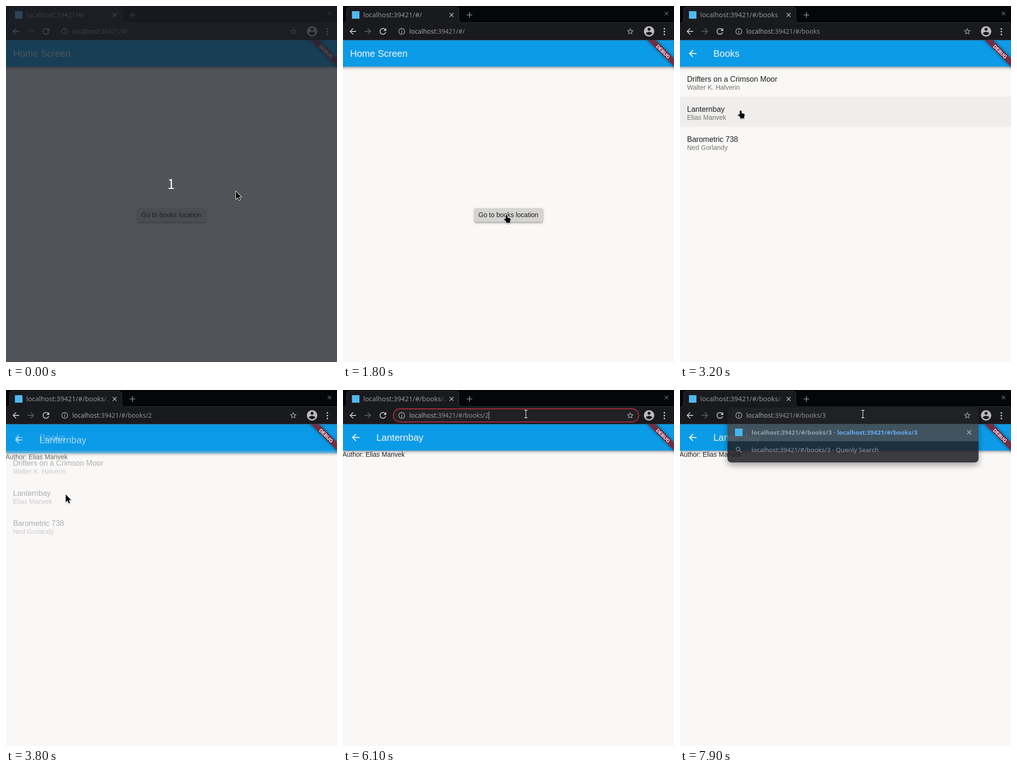
These frames come from a looping animation (704x757 px, 8 s). An HTML page with a canvas:

```html
<!DOCTYPE html>
<html lang="en">
<head>
<meta charset="utf-8">
<title>Book navigation</title>
<style>
html, body { margin: 0; width: 704px; height: 757px; overflow: hidden; background: #f9f8f7; }
canvas { display: block; }
</style>
</head>
<body>
<canvas id="stage" width="704" height="757"></canvas>
<script>
const W = 704, H = 757, LOOP = 8000, STEP = 100, TOP = 73;
const APP = '"Liberation Sans", Arial, sans-serif';
const UI = '"Noto Sans", "Open Sans", sans-serif';
const COUNT = '"Noto Sans CJK JP", "Noto Sans CJK SC", "Noto Sans CJK", sans-serif';
const BAR = '#191a1e', FIELD = '#202125', PAPER = '#f9f8f7', BLUE = '#0c9be7', RED = '#b02a3c', MARK = '#4fb9f0';
const SITE = 'localhost:39421/#/';
const BOOKS = [
  ['Drifters on a Crimson Moor', 'Walter K. Halverin'],
  ['Lanternbay', 'Elias Manvek'],
  ['Barometric 738', 'Ned Gorlandy']
];

const main = document.getElementById('stage').getContext('2d');
const spare = document.createElement('canvas');
spare.width = W;
spare.height = H;
const off = spare.getContext('2d');
let c = main;

const ICON = {
  back: 'M20 11H7.83l5.59-5.59L12 4l-8 8 8 8 1.41-1.41L7.83 13H20v-2z',
  reload: 'M17.65 6.35C16.2 4.9 14.21 4 12 4c-4.42 0-8 3.58-8 8s3.58 8 8 8c3.73 0 6.84-2.55 7.73-6h-2.08c-.82 2.33-3.04 4-5.65 4-3.31 0-6-2.69-6-6s2.69-6 6-6c1.66 0 3.14.69 4.22 1.78L13 11h7V4l-2.35 2.35z',
  star: 'M22 9.24l-7.19-.62L12 2 9.19 8.63 2 9.24l5.46 4.73L5.82 21 12 17.27 18.18 21l-1.63-7.03L22 9.24zM12 15.4l-3.76 2.27 1-4.28-3.32-2.88 4.38-.38L12 6.1l1.71 4.04 4.38.38-3.32 2.88 1 4.28L12 15.4z',
  person: 'M12 2C6.48 2 2 6.48 2 12s4.48 10 10 10 10-4.48 10-10S17.52 2 12 2zm0 3c1.66 0 3 1.34 3 3s-1.34 3-3 3-3-1.34-3-3 1.34-3 3-3zm0 14.2c-2.5 0-4.71-1.28-6-3.22.03-1.99 4-3.08 6-3.08 1.99 0 5.97 1.09 6 3.08-1.29 1.94-3.5 3.22-6 3.22z',
  search: 'M15.5 14h-.79l-.28-.27C15.41 12.59 16 11.11 16 9.5 16 5.91 13.09 3 9.5 3S3 5.91 3 9.5 5.91 16 9.5 16c1.61 0 3.09-.59 4.23-1.57l.27.28v.79l5 4.99L20.49 19l-4.99-5zm-6 0C7.01 14 5 11.99 5 9.5S7.01 5 9.5 5 14 7.01 14 9.5 11.99 14 9.5 14z'
};
for (const k in ICON) ICON[k] = new Path2D(ICON[k]);
const ARROW = new Path2D('M0 0V16.5L3.8 13L6.6 19L9.2 17.8L6.5 12H11.5Z');
const HAND = new Path2D('M0 1.5Q2 -.8 4 1.5V6L9 7Q11 8 10.5 10.5L9.2 14V17H1V14L-3.5 10Q-4 8 -2 8L0 9.2Z');

function rect(x, y, w, h, color) {
  c.fillStyle = color;
  c.fillRect(x, y, w, h);
}
function round(x, y, w, h, r) {
  c.beginPath();
  c.roundRect(x, y, w, h, r);
}
function shadow(color, blur, dy) {
  c.shadowColor = color;
  c.shadowBlur = blur;
  c.shadowOffsetY = dy;
}
function text(s, x, y, size, color, family = APP, weight = 'normal') {
  c.font = `${weight} ${size}px ${family}`;
  c.fillStyle = color;
  c.fillText(s, x, y);
  return x + c.measureText(s).width;
}
function icon(path, x, y, scale, color, flip = 1) {
  c.save();
  c.translate(x, y);
  c.scale(scale * flip, scale);
  c.translate(-12, -12);
  c.fillStyle = color;
  c.fill(path);
  c.restore();
}
function lines(points, color, width) {
  c.strokeStyle = color;
  c.lineWidth = width;
  c.beginPath();
  for (const [x1, y1, x2, y2] of points) {
    c.moveTo(x1, y1);
    c.lineTo(x2, y2);
  }
  c.stroke();
}
const cross = (x, y, r, color, w) =>
  lines([[x - r, y - r, x + r, y + r], [x - r, y + r, x + r, y - r]], color, w);

// Paint on the spare canvas, then blend the result as one piece
function layer(alpha, dy, paint) {
  off.clearRect(0, 0, W, H);
  c = off;
  paint();
  c = main;
  c.save();
  c.globalAlpha = alpha;
  c.drawImage(spare, 0, dy);
  c.restore();
}

function bezier(x1, y1, x2, y2) {
  const at = (a, b, u) => 3 * a * u * (1 - u) ** 2 + 3 * b * u * u * (1 - u) + u ** 3;
  return x => {
    let lo = 0, hi = 1;
    for (let i = 0; i < 24; i++) {
      const mid = (lo + hi) / 2;
      if (at(x1, x2, mid) < x) lo = mid; else hi = mid;
    }
    return at(y1, y2, lo);
  };
}
const easeIn = bezier(.42, 0, 1, 1);
const fastOutSlowIn = bezier(.4, 0, .2, 1);

function appBar(title, back) {
  c.save();
  shadow('rgba(0,0,0,.42)', 6, 2);
  rect(-10, TOP, W + 20, 56, BLUE);
  c.restore();
  if (back) icon(ICON.back, 27, 101, 1, '#f4f8fb');
  text(title, back ? 71 : 15, 108, 20, '#f2f8fc');
}

function home(t) {
  rect(0, TOP, W, H, PAPER);
  appBar('Home Screen', false);
  c.save();
  shadow('rgba(0,0,0,.4)', 4, 2);
  c.fillStyle = t < 800 ? '#e0e0df' : t < 1800 ? '#d9d8d7' : '#d5d4d3';
  round(280, 430, 145, 29, 2);
  c.fill();
  c.restore();
  text('Go to books location', 288, 449, 14, '#1f1f1f');
}

function list(t) {
  rect(0, TOP, W, H, PAPER);
  const hot = t >= 2600 && t < 2800 ? 2 : t >= 2800 && t < 3700 ? 1 : -1;
  if (hot >= 0) rect(0, 129 + hot * 64, W, 64, '#efeeed');
  appBar('Books', true);
  BOOKS.forEach(([title, author], i) => {
    text(title, 15, 161 + i * 64, 16, '#1f1f1f');
    text(author, 15, 178 + i * 64, 14, '#757574');
  });
}

function detail() {
  rect(0, TOP, W, H, PAPER);
  appBar(BOOKS[1][0], true);
  text('Author: ' + BOOKS[1][1], -1, 142, 14, '#1f1f1f');
}

function enter(t, start, from, to) {
  const p = Math.min(1, Math.max(0, (t - start) / 300));
  if (p < 1) from(t);
  if (p > 0) layer(easeIn(p), (1 - fastOutSlowIn(p)) * 171, () => to(t));
}

function banner() {
  c.save();
  c.translate(705, TOP);
  c.rotate(Math.PI / 4);
  c.save();
  shadow('rgba(0,0,0,.5)', 7, 0);
  rect(-60, 28, 120, 12, '#762d42');
  c.restore();
  c.textAlign = 'center';
  text('DEBUG', 0, 37.7, 10.2, '#fff', APP, '900');
  c.restore();
}

function pages(t) {
  c.save();
  c.beginPath();
  c.rect(0, TOP, W, H);
  c.clip();
  if (t < 2500) enter(t, 1866, home, list);
  else enter(t, 3566, list, detail);
  banner();
  c.restore();
}

function address(s, x) {
  const end = text(s.slice(0, 9), x, 59, 13.5, '#a4a4a4', UI);
  return text(s.slice(9), end, 59, 13.5, '#8d8d8f', UI);
}

function tabs(path) {
  rect(0, 0, W, 37, '#050608');
  rect(0, 36, W, 37, BAR);
  c.beginPath();
  c.moveTo(0, 36.5);
  c.quadraticCurveTo(7.5, 36.5, 7.5, 29);
  c.lineTo(7.5, 10);
  c.quadraticCurveTo(7.5, 2.5, 15, 2.5);
  c.lineTo(239, 2.5);
  c.quadraticCurveTo(246.5, 2.5, 246.5, 10);
  c.lineTo(246.5, 29);
  c.quadraticCurveTo(246.5, 35.5, 253, 35.5);
  c.lineTo(W, 35.5);
  c.strokeStyle = '#4b4c50';
  c.lineWidth = 1;
  c.stroke();
  c.lineTo(W, 40);
  c.lineTo(0, 40);
  c.fillStyle = BAR;
  c.fill();
  rect(0, 72, W, 1, '#45474b');

  rect(19, 11, 16, 16, MARK);
  const fade = c.createLinearGradient(206, 0, 219, 0);
  fade.addColorStop(0, '#929294');
  fade.addColorStop(1, 'rgba(146,146,148,0)');
  text(SITE + path, 43, 24, 14.3, fade, UI);
  cross(231, 19, 4, '#b4b4b6', 1.6);
  lines([[263, 19, 275, 19], [269, 13, 269, 25]], '#8a8a8c', 1.6);
  cross(688, 16, 3.5, '#6d6d70', 1.4);

  icon(ICON.back, 21, 54, .88, '#c4c4c6');
  icon(ICON.back, 53, 54, .88, '#58595d', -1);
  icon(ICON.reload, 85, 54, .88, '#c4c4c6');
  icon(ICON.person, 651, 54, 1.1, '#bcbcbe');
  c.fillStyle = '#c4c4c6';
  for (const y of [48.5, 54.5, 60.5]) {
    c.beginPath();
    c.arc(683.5, y, 1.7, 0, 7);
    c.fill();
  }
}

const caretOn = t => (t >= 5100 && t < 5600) || (t >= 6100 && t < 7300) || t === 7800;

function omnibox(path, t) {
  c.strokeStyle = '#a9a9ab';
  c.lineWidth = 1.4;
  c.beginPath();
  c.arc(125, 54, 6.3, 0, 7);
  c.stroke();
  rect(124.3, 53, 1.5, 4.5, '#a9a9ab');
  rect(124.3, 50, 1.5, 1.6, '#a9a9ab');
  icon(ICON.star, 611, 54, .72, '#a9a9ab');
  if (t >= 4800 && t < 5100) rect(141, 45, 169, 18, RED);
  const end = address(SITE + path, 141);
  if (t < 6600 && caretOn(t)) rect(Math.round(end), 45, 1, 18, '#c0c0c2');
}

function field(t) {
  if (t < 4700) return;
  round(107, 40, 522, 28, 14);
  c.fillStyle = FIELD;
  c.fill();
  if (t >= 4800 && t < 6600) {
    c.strokeStyle = RED;
    c.lineWidth = 2;
    c.stroke();
  }
}

function popup(path, t) {
  const url = SITE + path, rows = t < 6800 ? 5 : 2;
  c.save();
  shadow('rgba(0,0,0,.4)', 14, 6);
  c.fillStyle = FIELD;
  round(101, 37, 534, 43 + rows * 37, 8);
  c.fill();
  c.restore();
  rect(101, 72, 534, 37, '#48494c');
  rect(117, 82, 16, 16, MARK);
  text(url, 152, 95, 13, '#a0a0a1', UI, 'bold');
  const end = 152 + c.measureText(url).width;
  const next = text(' - ', end, 95, 13.5, '#a0a0a1', UI);
  text(url, next, 95, 13, '#76aef0', UI, 'bold');
  cross(615, 90, 4.5, '#b8b8ba', 1.6);
  icon(ICON.search, 125, 127, .68, '#8d8d8f');
  text(url + ' - Quenly Search', 152, 132, 13.45, '#98989a', UI);
  for (let i = 2; i < rows; i++) {
    rect(117, 82 + i * 37, 16, 16, MARK);
    text(SITE + ['books/2', 'books', ''][i - 2], 152, 95 + i * 37, 13.45, '#76aef0', UI);
  }
  if (t < 7900) {
    rect(117, 46, 16, 16, MARK);
    const x = address(url, 152);
    if (caretOn(t)) rect(Math.round(x), 45, 1, 18, '#c0c0c2');
  }
}

// Pointer moves: first step, last step, place reached
const MOVES = [
  [400, 500, 459, 411], [700, 900, 341, 446], [1200, 1300, 346, 444],
  [2400, 3000, 126, 222], [3200, 3200, 127, 222],
  [4200, 4300, 660, 122], [4500, 4800, 389, 51]
];
function pointer(t) {
  let x = 489, y = 394;
  for (const [a, b, px, py] of MOVES) {
    if (t < a) break;
    const p = Math.min(1, (t - a + STEP) / (b - a + STEP));
    const k = p * p * (3 - 2 * p);
    x += (px - x) * k;
    y += (py - y) * k;
  }
  c.save();
  c.translate(Math.round(x), Math.round(y));
  c.lineJoin = 'round';
  if (t >= 4700) {
    const beam = [[-3, -8, 3, -8], [0, -8, 0, 8], [-3, 8, 3, 8]];
    c.lineCap = 'square';
    lines(beam, '#000', 3.4);
    lines(beam, '#f4f4f4', 1.4);
  } else {
    const hand = (t >= 800 && t < 2400) || (t >= 2600 && t < 3700);
    const shape = hand ? HAND : ARROW;
    shadow('rgba(0,0,0,.35)', 2, 1);
    c.strokeStyle = '#fff';
    c.lineWidth = 2;
    c.stroke(shape);
    c.shadowColor = 'transparent';
    c.fillStyle = '#050505';
    c.fill(shape);
  }
  c.restore();
}

function draw(t) {
  const path = t < 1900 ? '' : t < 3600 ? 'books' : t < 6600 ? 'books/2' : t < 6800 ? 'books/' : 'books/3';
  const tab = t < 6600 || t >= 7900 ? path : 'books/2';
  pages(t);
  tabs(tab);
  field(t);
  if (t < 6600) omnibox(path, t);
  else if (t < 7900) popup(path, t);
  else {
    layer(.87, 0, () => popup(path, t));
    omnibox(path, t);
  }
  if (t < 100) {
    rect(0, 0, W, H, 'rgba(28,33,40,.76)');
    c.textAlign = 'center';
    text('1', 351, 389, 28, '#fff', COUNT);
    c.textAlign = 'left';
  }
  pointer(t);
}

const begin = performance.now();
function tick() {
  const now = (performance.now() - begin) % LOOP;
  draw(Math.floor(now / STEP) * STEP);
  requestAnimationFrame(tick);
}
tick();
</script>
</body>
</html>
```
